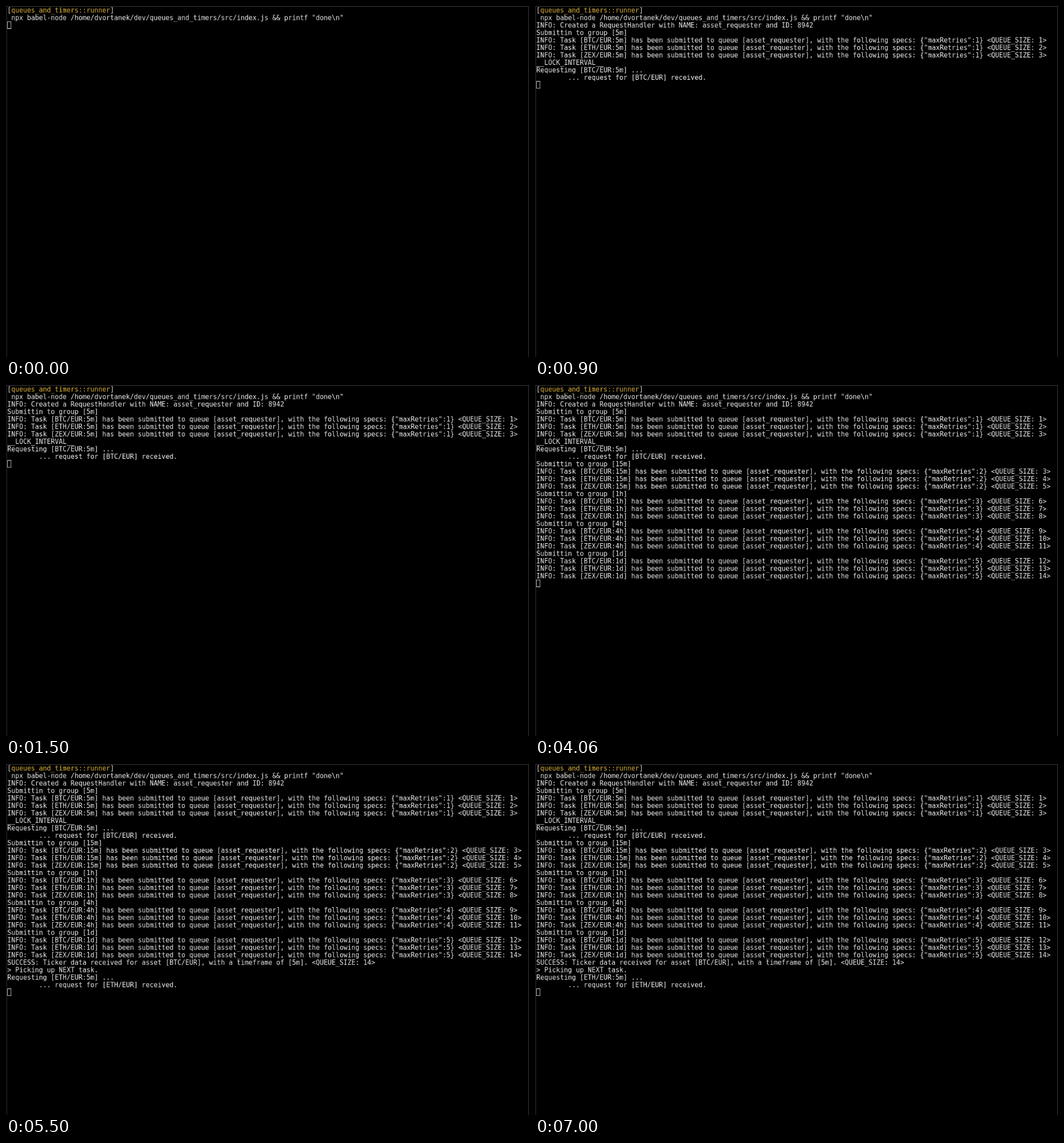
Recreate the animation shown at these times as an HTML page with a canvas. Size 913 by 613 pixels, loop 8 s.

```html
<!DOCTYPE html>
<html lang="en">
<head>
<meta charset="utf-8">
<title>Queue runner</title>
<style>
  html, body { margin: 0; width: 100%; height: 100%; overflow: hidden; background: #000; }
  canvas { display: block; }
</style>
</head>
<body>
<canvas id="stage" width="913" height="613"></canvas>
<script>
const LOOP = 8000;
const CELL = { w: 9, h: 17, left: 3, top: 1, baseline: 14 };
const COLOR = { text: '#eeeeec', title: '#e4b83e', border: '#444444' };

const stage = document.getElementById('stage').getContext('2d');

// The terminal is drawn at its own resolution, then scaled to the stage.
const screen = document.createElement('canvas');
screen.width = 1190;
screen.height = 799;
const term = screen.getContext('2d');

const title = 'queues_and_timers::runner';
const command = ' npx babel-node /home/dvortanek/dev/queues_and_timers/src/index.js && printf "done\\n"';

const request = asset => [
  `Requesting [${asset}/EUR:5m] ...`,
  `        ... request for [${asset}/EUR] received.`
];

const group = (frame, retries, firstSize) => [
  `Submittin to group [${frame}]`,
  ...['BTC', 'ETH', 'ZEX'].map((asset, i) =>
    `INFO: Task [${asset}/EUR:${frame}] has been submitted to queue [asset_requester], ` +
    `with the following specs: {"maxRetries":${retries}} <QUEUE_SIZE: ${firstSize + i}>`)
];

const output = [
  { at: 0, lines: [`[${title}]`, command] },
  { at: 900, lines: [
    'INFO: Created a RequestHandler with NAME: asset_requester and ID: 8942',
    ...group('5m', 1, 1),
    '__LOCK_INTERVAL__',
    ...request('BTC')
  ] },
  { at: 1900, lines: [
    ...group('15m', 2, 3),
    ...group('1h', 3, 6),
    ...group('4h', 4, 9),
    ...group('1d', 5, 12)
  ] },
  { at: 5500, lines: [
    'SUCCESS: Ticker data received for asset [BTC/EUR], with a timeframe of [5m]. <QUEUE_SIZE: 14>',
    '> Picking up NEXT task.',
    ...request('ETH')
  ] }
];

function drawLine(text, row) {
  const y = CELL.top + row * CELL.h + CELL.baseline;
  [...text].forEach((char, col) => {
    const inTitle = row === 0 && col > 0 && col <= title.length;
    term.fillStyle = inTitle ? COLOR.title : COLOR.text;
    term.fillText(char, CELL.left + col * CELL.w, y);
  });
}

function drawCursor(row) {
  term.strokeStyle = COLOR.text;
  term.strokeRect(CELL.left + 0.5, CELL.top + row * CELL.h + 0.5, CELL.w - 1, CELL.h - 1);
}

function drawBorder() {
  term.fillStyle = COLOR.border;
  term.fillRect(1, 0, screen.width - 1, 1);
  term.fillRect(1, 0, 1, screen.height);
  term.fillRect(screen.width - 1, 0, 1, screen.height);
}

function draw(time) {
  const lines = output.filter(block => time >= block.at).flatMap(block => block.lines);
  term.fillStyle = '#000';
  term.fillRect(0, 0, screen.width, screen.height);
  term.font = '15px "DejaVu Sans Mono", monospace';
  drawBorder();
  lines.forEach(drawLine);
  drawCursor(lines.length);
  stage.imageSmoothingQuality = 'high';
  stage.drawImage(screen, 0, 0, 913, 613);
}

const start = performance.now();
let shown = -1;

function tick() {
  const time = (performance.now() - start) % LOOP;
  const step = output.filter(block => time >= block.at).length;
  if (step !== shown) {
    draw(time);
    shown = step;
  }
  requestAnimationFrame(tick);
}
tick();
</script>
</body>
</html>
```
